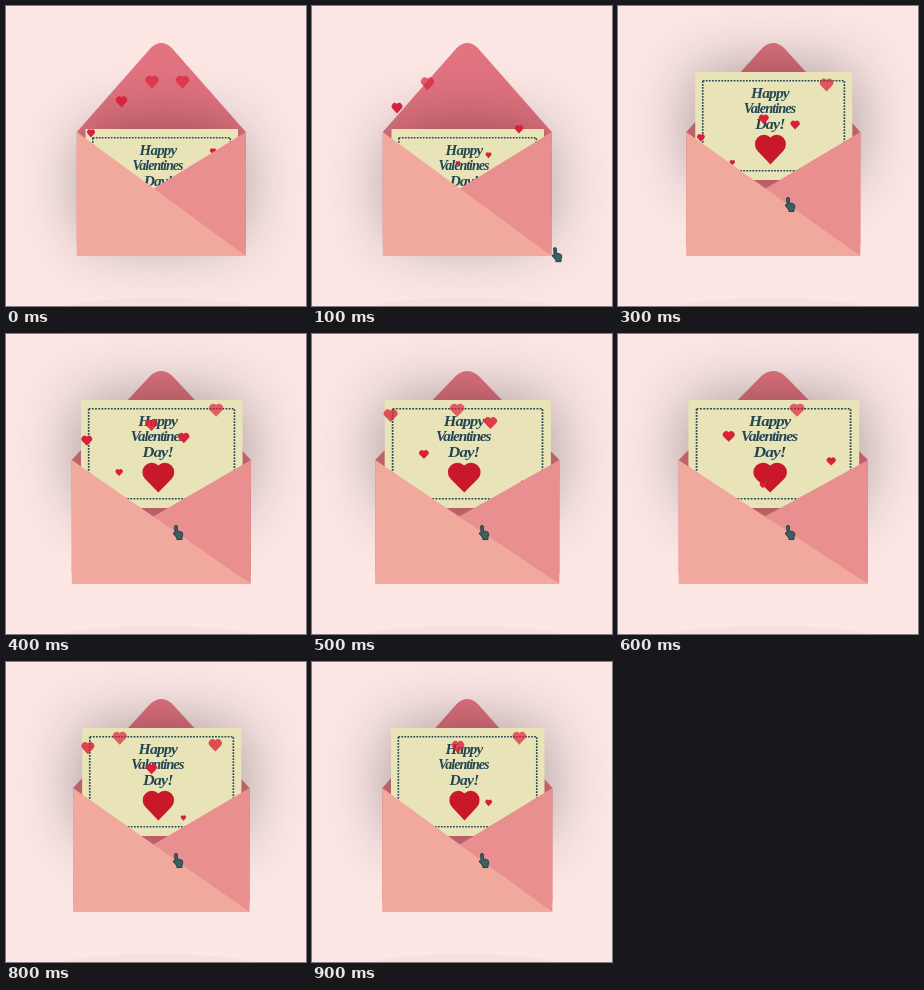
An HTML page with a canvas for the animation above (1000 ms loop, 300 by 300 pixels).

```html
<!DOCTYPE html>
<html lang="en">
<head>
<meta charset="utf-8">
<title>Valentine envelope</title>
<style>
html, body { margin: 0; height: 100%; overflow: hidden; background: #fce7e5; }
canvas { display: block; width: 100vw; height: 100vh; }
</style>
</head>
<body>
<canvas id="stage"></canvas>
<script>
const STEP = 100, STEPS = 10;
const MID = 155.3, LEFT = 70.8, RIGHT = 239.8, CORNER = 126, CEILING = 76;
const canvas = document.getElementById('stage');
const ctx = canvas.getContext('2d');
const ratio = window.devicePixelRatio || 1;
canvas.width = canvas.height = 300 * ratio;

// One heart per column; speed, period and age are counted in steps
const hearts = [
  { from: 132, speed: 25, period: 3.18, age: 0.2 },
  { from: 157, speed: 18, period: 6.35, age: 3.4 },
  { from: 157, speed: 22, period: 4.72, age: 3.72 },
  { from: 157, speed: 15, period: 7.45, age: 7 },
  { from: 157, speed: 22, period: 5.19, age: 0.55 }
];

const pointerStops = [[240, 241], [210.5, 184.8], [167, 190.8]];
const hand = new Path2D('M3.2.6Q4.8.6 4.8 2.2V6.2L9 7.2Q10.8 7.8 10.6 9.8L9.8 13V15H4.2V13.4L.6 9.4Q0 7.6 1.8 8L2.4 8.6 1.7 2.2Q1.6.6 3.2.6Z');

function shape(color, ...points) {
  ctx.fillStyle = color;
  ctx.beginPath();
  points.forEach(p => ctx.lineTo(...p));
  ctx.fill();
}

function heart(x, y, w, color) {
  const d = w / 2.414, r = d * Math.SQRT1_2;
  ctx.save();
  ctx.translate(x, y);
  ctx.scale(1, 1.08);
  ctx.fillStyle = color;
  ctx.beginPath();
  ctx.moveTo(0, d);
  ctx.arc(-d / 2, -d / 2, r, Math.PI * 0.75, Math.PI * 1.75);
  ctx.arc(d / 2, -d / 2, r, Math.PI * 1.25, Math.PI * 2.25);
  ctx.fill();
  ctx.restore();
}

function drawFlap() {
  ctx.fillStyle = '#e27480';
  ctx.beginPath();
  ctx.moveTo(LEFT, CORNER);
  ctx.lineTo(144.7, 42);
  ctx.quadraticCurveTo(MID, 32, 165.8, 42);
  ctx.lineTo(RIGHT, CORNER);
  ctx.lineTo(RIGHT, 240);
  ctx.lineTo(LEFT, 240);
  ctx.fill();
}

function drawCard(top) {
  ctx.save();
  ctx.shadowColor = 'rgba(0,0,0,.38)';
  ctx.shadowBlur = 66 * ratio;
  ctx.fillStyle = '#e8e4b8';
  ctx.fillRect(79.5, top, 152.5, 108);
  ctx.restore();

  ctx.strokeStyle = ctx.fillStyle = '#234653';
  ctx.lineWidth = 1.6;
  ctx.setLineDash([1.7, 1.3]);
  ctx.strokeRect(86.8, top + 8.7, 137.5, 90);
  ctx.setLineDash([]);

  ctx.textAlign = 'center';
  const line = (text, size, spacing, x, y) => {
    ctx.font = `italic bold ${size}px "Liberation Serif", serif`;
    ctx.letterSpacing = spacing + 'px';
    ctx.fillText(text, x, top + y);
  };
  line('Happy', 15, -0.8, 152, 26);
  line('Valentines', 14, -1, 151.5, 41);
  line('Day!', 15.5, -0.8, 152, 57);
  heart(152.5, top + 79, 30, '#c81829');
}

function drawHeart({ from, speed, period, age }, column, t) {
  const u = (age + t) % period;
  if (period - u < 0.4) return;
  const y = Math.max(CEILING, from - speed * u);
  ctx.globalAlpha = Math.min(1, 1 - (100 - y) / 75);
  heart(85 + 30.5 * column, y + 0.8, 6.3 + (145 - y) * 0.1, '#da1f38');
  ctx.globalAlpha = 1;
}

function drawPointer(t) {
  if (t < 1) return;
  ctx.save();
  ctx.translate(...pointerStops[Math.min(t, 3) - 1]);
  ctx.scale(0.92, 0.98);
  ctx.fillStyle = '#3c6060';
  ctx.strokeStyle = '#1f3f45';
  ctx.fill(hand);
  ctx.stroke(hand);
  ctx.restore();
}

function draw(t) {
  const open = t > 2;
  // The envelope swells sideways, then shrinks back
  const swell = Math.max(0, Math.min((t - 2) / 4, 1 - (t - 6) * 0.315));
  ctx.setTransform(ratio, 0, 0, ratio, 0, 0);
  ctx.fillStyle = '#fce7e5';
  ctx.fillRect(0, 0, 300, 300);

  ctx.save();
  ctx.translate(MID, 0);
  ctx.scale(1 + 0.12 * swell, 1);
  ctx.translate(-MID, 0);

  ctx.fillStyle = '#f6e1df';
  ctx.beginPath();
  ctx.ellipse(152, 304, 96, 12, 0, 0, 7);
  ctx.fill();

  drawFlap();
  drawCard(open ? 66 : 123);
  hearts.forEach((h, column) => drawHeart(h, column, t));

  shape('#e98f8f', [RIGHT, CORNER], [147, 183], [147, 190], [RIGHT, 250]);
  shape('#f1a89d', [LEFT, CORNER], [RIGHT, 250], [LEFT, 250]);
  ctx.restore();

  drawPointer(t);
}

const start = performance.now();
function tick() {
  draw(Math.floor((performance.now() - start) / STEP) % STEPS);
  requestAnimationFrame(tick);
}
tick();
</script>
</body>
</html>
```
